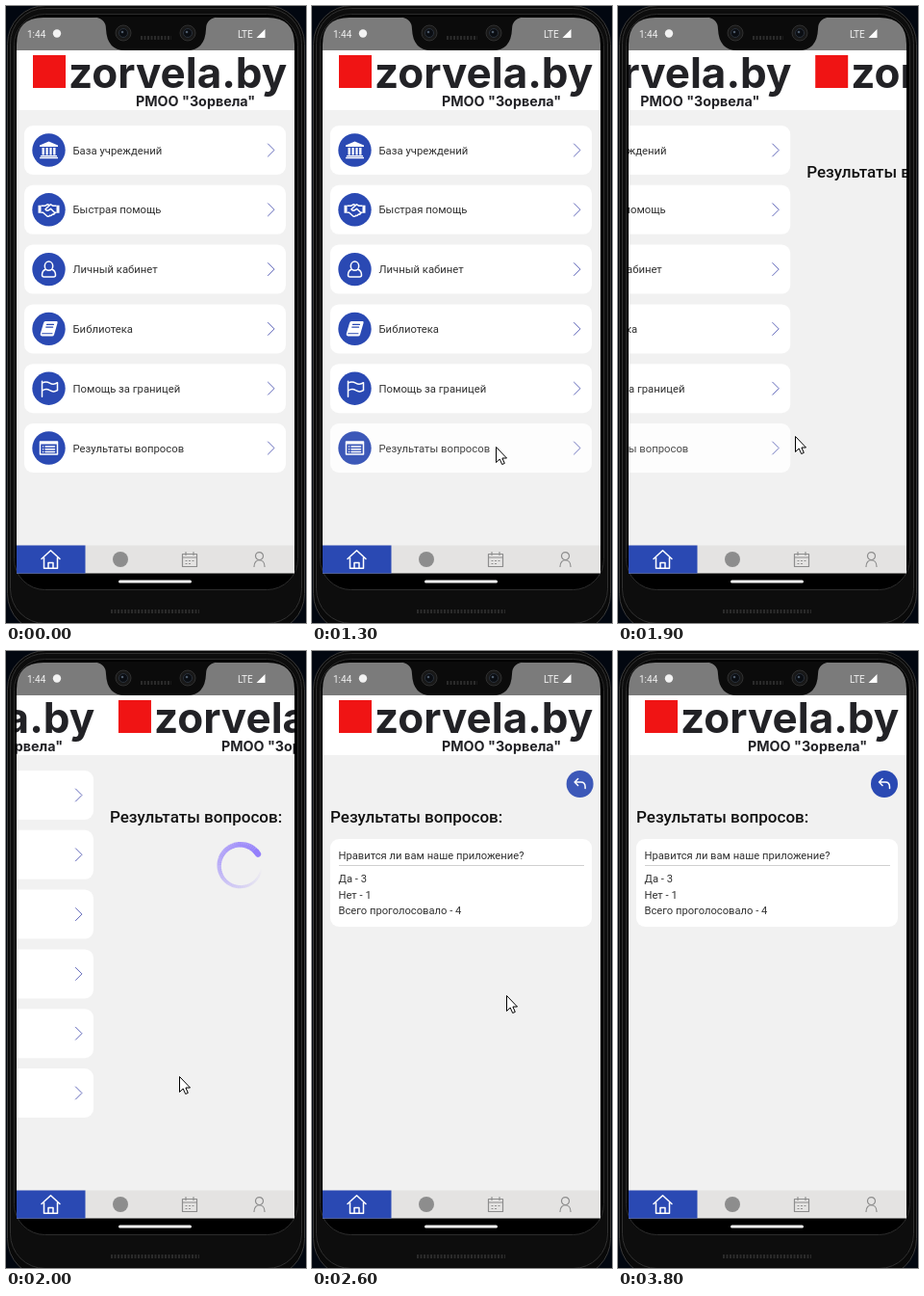
Recreate the animation shown at these times as an HTML page. Size 312 by 640 pixels, loop 4.7 s.

```html
<!DOCTYPE html>
<html lang="ru">
<head>
<meta charset="utf-8">
<title>Phone app</title>
<style>
html, body { margin: 0; width: 100%; height: 100%; overflow: hidden; background: #020710; }
svg { display: block; width: 312px; height: 640px; }
text { font: 11.3px Roboto, sans-serif; fill: #303030; }
.status { font-size: 10px; fill: #f2f2f2; }
.head { font-size: 17px; font-weight: 500; fill: #111; }
.brand { font: 700 44px Inter, sans-serif; fill: #222226; }
.sub { font: 700 14.3px Inter, sans-serif; fill: #222226; }
.small { font-size: 11.2px; }
.line { fill: none; stroke: #fff; stroke-width: 1.5; stroke-linejoin: round; stroke-linecap: round; }
.grey { stroke: #8d8d8d; stroke-width: 1.2; }
.solid { fill: #fff; }
</style>
</head>
<body>
<svg id="stage" viewBox="0 0 312 640"></svg>
<script>
const BLUE = '#2a49b3', PAGE_W = 289, LOOP = 4700;

const rect = (x, y, w, h, fill, r = 0, extra = '') =>
  `<rect x="${x}" y="${y}" width="${w}" height="${h}" rx="${r}" fill="${fill}" ${extra}/>`;
const circle = (x, y, r, fill, extra = '') =>
  `<circle cx="${x}" cy="${y}" r="${r}" fill="${fill}" ${extra}/>`;
const label = (x, y, s, cls = '') => `<text x="${x}" y="${y}" class="${cls}">${s}</text>`;
const path = (d, cls = 'line', extra = '') => `<path d="${d}" class="${cls}" ${extra}/>`;
const group = (x, y, body, extra = '') => `<g transform="translate(${x} ${y})" ${extra}>${body}</g>`;

// Menu icons, each centred on 0,0
const bank = path('M0-9L9.5-5V-3.5H-9.5V-5ZM-7-2.5h2.4v7.5h-2.4zM-3-2.5h2.2v7.5h-2.2zM.9-2.5h2.2v7.5h-2.2zM4.6-2.5H7v7.5H4.6zM-8.5 5.5h17v1.3h-17zM-9.5 7.3h19v1.5h-19z', 'solid');
const hands = path('M-11-4.5h3v8h-3zM8-4.5h3v8h-3z', 'solid') +
  path('M-7.5-4H-4L-1.5-5.5L1-4.5M7.5-4H4.5L2-5.5L-3.5-.5Q-2 2 .5 0L2-1L6.5 3.5M-7.5 3H-6L-2 6.5Q0 7.5 1 6Q3 6.5 3.5 5Q6 5 6.5 3H7.5');
const person = path('M0-8a4.2 4.6 0 1 1 0 9.2a4.2 4.6 0 1 1 0-9.2M-3.2 .2C-6 1-7 3.5-7 6Q-7 8-5 8H5Q7 8 7 6C7 3.5 6 1 3.2 .2');
const book = path('M-3.5-8H8.5Q9.5-7.5 9-6L5.5 6Q5 7.5 3.5 7.5H-7Q-9.5 7-8.5 4L-5.5-6Q-5-8-3.5-8Z', 'solid') +
  path('M-2-4.5H5M-2.8-1.8H4.2M-6.8 4.8H3.5', 'line', `style="stroke:${BLUE};stroke-width:1.1"`);
const flag = path('M-7-7.5V8.5M-7-5.5Q-3-8 1-5.5T9-6V2Q5 4.5 1 2T-7 2.5');
const list = path('M-9-6.5H9V6.5H-9Z') + path('M-9-6.5H9V-4H-9Z', 'solid') +
  path('M-6-1.5h.1M-3.5-1.5H6M-6 1.2h.1M-3.5 1.2H6M-6 4h.1M-3.5 4H6');

const menu = [
  ['База учреждений', bank],
  ['Быстрая помощь', hands],
  ['Личный кабинет', person],
  ['Библиотека', book],
  ['Помощь за границей', flag],
  ['Результаты вопросов', list]
];

const header = rect(11, 46, PAGE_W, 62, '#fff') + rect(28, 51, 34, 34, '#f01414') +
  label(65, 84.5, 'zorvela.by', 'brand') + label(135, 104, 'РМОО "Зорвела"', 'sub');

const row = ([name, icon], i) => group(0, 149.5 + 61.8 * i,
  rect(19, -25.5, 272, 51, '#fff', 9) + circle(44.5, 0, 17.2, BLUE) + group(44.5, 0, icon) +
  label(69.5, 4, name) +
  path('M272.5-6.5L279 0L272.5 6.5', 'line', 'style="stroke:#6168ba;stroke-width:1"'),
  i === 5 ? 'id="pressed"' : '');

function spinnerArc() {
  const at = a => `${22 * Math.cos(a)} ${22 * Math.sin(a)}`;
  let s = '';
  for (let i = 0; i < 60; i++) {
    const a = -0.58 - i * 0.092, k = 1 - i / 60;
    s += `<path d="M${at(a)}L${at(a - 0.1)}" stroke="#947ffb" stroke-width="${2 + 4.3 * k}"
      stroke-opacity="${k}" ${i ? '' : 'stroke-linecap="round"'}/>`;
  }
  return s;
}

const results = header + label(19, 178, 'Результаты вопросов:', 'head') +
  group(154.7, 222.7, `<g id="spinner">${spinnerArc()}</g>`) +
  `<g id="answers">${rect(19, 195, 272, 91, '#fff', 9)}${rect(28, 222, 255, 1, '#d0d0d0')}` +
  label(27.5, 215.5, 'Нравится ли вам наше приложение?', 'small') +
  label(27.5, 239.5, 'Да - 3', 'small') + label(27.5, 256.5, 'Нет - 1', 'small') +
  label(27.5, 273, 'Всего проголосовало - 4', 'small') + '</g>' +
  `<g id="back">${circle(277, 138, 14, BLUE)}` +
  group(277, 138, path('M-2-5.5L-5.5-2L-2 1.5M-5.5-2H1Q5.5-2 5.5 3V4.5')) + '</g>';

const tabs = rect(11, 559.5, PAGE_W, 29, '#e4e3e2') + rect(11, 559.5, 71.5, 29, BLUE) +
  group(46.5, 574, path('M-9.5-.5L0-9.2L9.5-.5M-7-2V9.2H7V-2M-2.5 9V3.5H2.5V9')) +
  circle(119, 574, 8, '#8d8d8d') +
  group(191, 574, path('M-7.5-5.5H7.5V7.5H-7.5ZM-7.5-2H7.5M-4-7.5V-4.5M4-7.5V-4.5M-4 1.5h1M-.5 1.5h1M3 1.5h1M-4 4.5h1M-.5 4.5h1', 'line grey')) +
  group(263.5, 574, circle(0, -3.4, 4, 'none', 'class="line grey"') +
    path('M-5.5 7.5C-5.5-1.5 5.5-1.5 5.5 7.5', 'line grey'));

const lens = x => circle(x, 28, 8, '#181818', 'stroke="#303030"') +
  circle(x, 28, 4.5, '#0a0d12', 'stroke="#29303a"') + circle(x - 1, 27, 1.3, '#4c5968');
const grille = (x1, x2, y) =>
  `<path d="M${x1} ${y}H${x2}" stroke="#2b2b2b" stroke-width="4" stroke-dasharray="2 1.5"/>`;

const shell = rect(1.5, -.5, 309, 650, '#090909', 40, 'stroke="#3a3a3a"') +
  rect(4.5, 2.5, 303, 638, '#0d0d0d', 36, 'stroke="#303030"') +
  rect(8.5, 8.5, 295, 597, '#000', 32, 'stroke="#2c2c2c"');

const statusBar = path('M11 46V40Q11 12 39 12H272Q300 12 300 40V46Z', '', 'fill="#7b7b7b"') +
  path('M89 11Q104 12 104 24Q105 46 124 46H188Q207 46 208 24Q208 12 223 11Z', '', 'fill="#0b0b0b"') +
  lens(122) + lens(189) + grille(140, 172, 33) +
  label(22, 32.5, '1:44', 'status') + circle(53, 28.5, 4.2, '#f2f2f2') +
  label(241, 32.5, 'LTE', 'status') + path('M260.5 33H269.5V24Z', 'solid');

const $ = id => document.getElementById(id);
$('stage').innerHTML =
  `<clipPath id="view">${rect(11, 46, PAGE_W, 514, '#000')}</clipPath>` + shell + statusBar +
  `<g clip-path="url(#view)">${rect(11, 46, PAGE_W, 514, '#f1f1f1')}${rect(11, 46, PAGE_W, 62, '#fff')}` +
  `<g id="home">${header}${menu.map(row).join('')}</g><g id="results">${results}</g></g>` +
  tabs + rect(117, 595.5, 76, 3, '#f4f4f4', 1.5) + grille(109, 201, 628) +
  path('M.5 .5V16.5L4.2 13L6.7 18.5L9.3 17.4L6.9 12H11.5Z', '', 'id="cursor" fill="#fff" stroke="#000"');

// Linear interpolation over [time, ...values]
function track(keys, t) {
  const n = keys.findIndex(k => k[0] > t);
  if (n < 1) return keys[n ? keys.length - 1 : 0].slice(1);
  const a = keys[n - 1], b = keys[n], u = (t - a[0]) / (b[0] - a[0]);
  return a.slice(1).map((v, i) => v + (b[i + 1] - v) * u);
}

const cursorPath = [
  [300, 204, 398], [600, 187, 440], [800, 191, 457], [1700, 191, 457], [1800, 188, 451],
  [2000, 180, 441], [2300, 180, 441], [2600, 202, 357], [2900, 113, 262], [3200, 76, 230],
  [3500, 196, 267], [3700, 117, 258]
];
const pressFade = [[1200, 1], [1500, 0.72], [1800, 0.72], [2000, 1]];

const move = (id, x, y = 0) => $(id).setAttribute('transform', `translate(${x} ${y})`);
const show = (id, on) => $(id).setAttribute('visibility', on ? 'visible' : 'hidden');

function draw(now) {
  const t = Math.floor(now % LOOP / 100) * 100; // the screen updates ten times a second
  const u = Math.min(1, Math.max(0, (t - 1800) / 400));
  const slide = PAGE_W * (1 - (1 - u) ** 1.7);
  move('home', -slide);
  move('results', PAGE_W - slide);
  $('pressed').setAttribute('opacity', track(pressFade, t)[0]);

  $('spinner').setAttribute('transform', `rotate(${(t - 2000) * 0.36})`);
  show('spinner', t < 2200);
  show('answers', t >= 2200);
  show('back', t >= 2200);
  const k = t < 2900 ? Math.exp((2200 - t) / 200) : 0;
  move('back', 12 * k);
  $('back').setAttribute('opacity', 1 - 0.7 * k);

  move('cursor', ...track(cursorPath, t));
  show('cursor', t >= 300 && t < 3800);
}

const start = performance.now();
function tick() {
  draw(performance.now() - start);
  requestAnimationFrame(tick);
}
tick();
</script>
</body>
</html>
```
